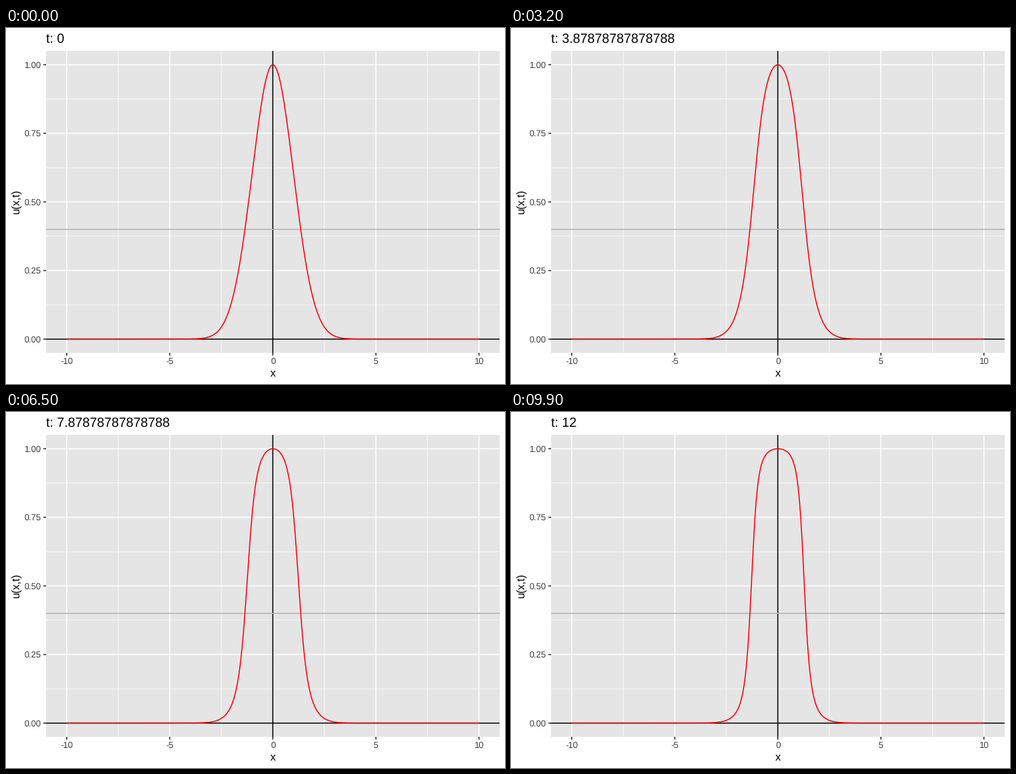
Recreate the animation shown at these times as a matplotlib script. Size 672x480 px, loop 10000 ms.

```python
import matplotlib.pyplot as plt
import numpy as np
from matplotlib.animation import FuncAnimation
from matplotlib.patches import Rectangle

W, H, DPI = 672, 480, 96
FRAMES, T_END = 100, 12
RATE, THRESHOLD = 1 / 3, 0.4
LEFT, RIGHT, TOP, BOTTOM = 54, 664.67, 31, 438

plt.rcParams["font.family"] = "Liberation Sans"
plt.rcParams["text.hinting"] = "none"


def px(x):
    return LEFT + (np.asarray(x) + 11) * (RIGHT - LEFT) / 22


def py(u):
    return BOTTOM - (np.asarray(u) + 0.05) * (BOTTOM - TOP) / 1.1


def growth(u):
    return RATE * u * (1 - u) * (u - THRESHOLD)


def solve(u, times, substeps=4):
    """Integrate the bistable reaction with RK4, one row per time."""
    rows = [u]
    h = (times[1] - times[0]) / substeps
    for _ in times[1:]:
        for _ in range(substeps):
            k1 = growth(u)
            k2 = growth(u + h / 2 * k1)
            k3 = growth(u + h / 2 * k2)
            k4 = growth(u + h * k3)
            u = u + h / 6 * (k1 + 2 * k2 + 2 * k3 + k4)
        rows.append(u)
    return np.array(rows)


fig = plt.figure(figsize=(W / DPI, H / DPI), dpi=DPI, facecolor="white")
ax = fig.add_axes([0, 0, 1, 1])
ax.set(xlim=(0, W), ylim=(H, 0))
ax.axis("off")


def stroke(xs, ys, color, width, z):
    return ax.plot(xs, ys, color=color, lw=width * 72 / DPI, zorder=z,
                   solid_capstyle="butt", solid_joinstyle="round",
                   snap=False)[0]


def hline(u, color, width, z):
    stroke([LEFT, RIGHT], [py(u)] * 2, color, width, z)


def vline(x, color, width, z):
    stroke([px(x)] * 2, [TOP, BOTTOM], color, width, z)


def label(x, y, text, size, color="black", **kw):
    kw.setdefault("va", "baseline")
    return ax.text(x, y, text, fontsize=size, color=color, **kw)


ax.add_patch(Rectangle((LEFT, TOP), RIGHT - LEFT, BOTTOM - TOP,
                       fc="#E5E5E5", ec="none", zorder=0))

for x in np.arange(-7.5, 10, 5):
    vline(x, "white", 0.71, 1)
for u in np.arange(0.125, 1, 0.25):
    hline(u, "white", 0.71, 1)

for x in range(-10, 11, 5):
    vline(x, "white", 1.42, 2)
    stroke([px(x)] * 2, [BOTTOM, BOTTOM + 3.67], "#262626", 1.42, 2)
    label(px(x), 453.1, str(x), 8.8, "#3F3F3F", ha="center")
for u in np.linspace(0, 1, 5):
    hline(u, "white", 1.42, 2)
    stroke([LEFT - 3.67, LEFT], [py(u)] * 2, "#262626", 1.42, 2)
    label(47.4, py(u) + 4.2, f"{u:.2f}", 8.8, "#3F3F3F", ha="right")

hline(0, "black", 1.42, 3)
vline(0, "black", 1.42, 3)
hline(THRESHOLD, "#B2B2B2", 1.42, 4)

label(px(0), 470, "x", 11, ha="center")
label(18, py(0.5), "u(x,t)", 11, rotation=90, ha="right", va="center",
      rotation_mode="default").set_x(21.3)
title = label(LEFT - 0.3, 20, "", 13.2, ha="left")

xs = np.linspace(-10, 10, 401)
times = np.linspace(0, T_END, FRAMES)
waves = solve(np.exp(-xs**2 / 2), times)
curve = stroke(px(xs), py(waves[0]), "#FB0007", 1.42, 5)


def update(i):
    title.set_text(f"t: {times[i]:.15g}")
    curve.set_ydata(py(waves[i]))
    return title, curve


anim = FuncAnimation(fig, update, frames=FRAMES, interval=100,
                     repeat=True, repeat_delay=0)
plt.show()
```
